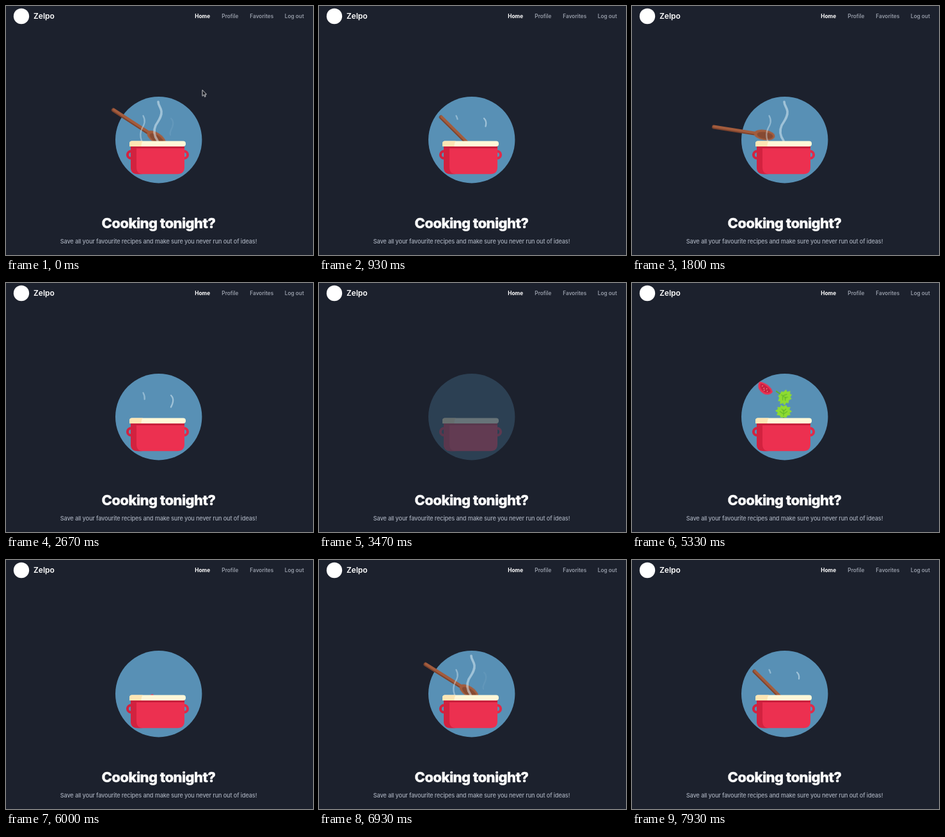
Write an HTML page that moves like this. It is 480 px wide and 390 px high and loops after 8 s.

```html
<!DOCTYPE html>
<html lang="en">
<head>
<meta charset="utf-8">
<title>Cooking tonight?</title>
<style>
  html, body { margin: 0; width: 100%; height: 100%; overflow: hidden; background: #1c212d; }
  svg { display: block; width: 100vw; height: 100vh; font-family: Inter, sans-serif; }
  text { fill: #fff; }
  .nav { font-size: 8.3px; font-weight: 600; }
  .nav .link { fill: #959ba7; }
  .nav .on { font-weight: 700; }
  .brand { font-size: 12px; font-weight: 600; }
  .title { font-size: 22px; font-weight: 800; letter-spacing: -.025em; text-anchor: middle; stroke: #fff; stroke-width: .35; }
  .sub { font-size: 9.2px; font-weight: 500; letter-spacing: -.017em; text-anchor: middle; fill: #a4abb8; }

  .fade, .spoon, .steam path, .cursor { animation: 8s linear infinite; }

  .fade { animation-name: fade; }
  @keyframes fade {
    0%, 40.25% { opacity: 1; }
    44.62% { opacity: 0; }
    51%, 100% { opacity: 1; }
  }

  .spoon { animation-name: stir, spoon-show; animation-timing-function: ease-in-out, linear; }
  @keyframes stir {
    0% { transform: translate(235px, 206.5px) rotate(33deg); }
    3.1%, 12.2%, 90%, 99.1% { transform: translate(248px, 231px) rotate(45deg); }
    7.5%, 16%, 87.5%, 94.4% { transform: translate(235.5px, 206px) rotate(33deg); }
    21%, 81.5% { transform: translate(207px, 202px) rotate(9deg); }
    100% { transform: translate(247px, 229px) rotate(44deg); }
  }
  @keyframes spoon-show {
    0%, 23% { opacity: 1; }
    30%, 81.5% { opacity: 0; }
    82.6%, 100% { opacity: 1; }
  }

  /* One wisp is drawn and wiped off per dash period of 4. */
  .steam { fill: none; stroke: #e1f0f8; stroke-linecap: round; }
  .steam path { stroke-dasharray: 1 3; }
  .mid { stroke-width: 3.6; stroke-opacity: .52; animation-name: mid !important; }
  .left { stroke-width: 2.3; stroke-opacity: .42; animation-name: left !important; }
  .right { stroke-width: 2.3; stroke-opacity: .52; animation-name: right, right-show !important; }
  @keyframes mid {
    0%, 4.4% { stroke-dashoffset: 0; }
    10.6% { stroke-dashoffset: -1.1; }
    16.9% { stroke-dashoffset: -2.9; }
    21.25%, 27% { stroke-dashoffset: -4; }
    33% { stroke-dashoffset: -5.1; }
    81.9% { stroke-dashoffset: -6.9; }
    86.3%, 91.2% { stroke-dashoffset: -8; }
    97.5%, 100% { stroke-dashoffset: -9.1; }
  }
  @keyframes left {
    0%, 6.25% { stroke-dashoffset: 0; }
    13.1% { stroke-dashoffset: -1.1; }
    17.25% { stroke-dashoffset: -2.9; }
    21.75%, 28.75% { stroke-dashoffset: -4; }
    35.6% { stroke-dashoffset: -5.1; }
    81.6% { stroke-dashoffset: -6.9; }
    86.1%, 93.1% { stroke-dashoffset: -8; }
    100% { stroke-dashoffset: -9; }
  }
  @keyframes right {
    0%, 8.1% { stroke-dashoffset: 0; }
    15.6% { stroke-dashoffset: -1.1; }
    22.5%, 31.8% { stroke-dashoffset: -4; }
    38% { stroke-dashoffset: -5.1; }
    85%, 95% { stroke-dashoffset: -8; }
    100% { stroke-dashoffset: -8.73; }
  }
  @keyframes right-show {
    0%, 86.9% { opacity: .15; }
    3%, 15.5%, 27%, 37.9%, 90%, 100% { opacity: 1; }
    15.6%, 22.5%, 38%, 85% { opacity: 0; }
  }

  .food { animation: fall 8s infinite backwards; }
  @keyframes fall {
    0% { transform: var(--from); opacity: 0; animation-timing-function: cubic-bezier(.333, 0, .667, .333); }
    1%, 12% { opacity: 1; }
    12% { transform: var(--to); }
    12.01%, 100% { transform: var(--to); opacity: 0; }
  }
  .herb1 { --from: translate(237px, 145px) rotate(0deg); --to: translate(237px, 232px) rotate(0deg); animation-delay: 4.56s; }
  .herb2 { --from: translate(239px, 153px) rotate(150deg); --to: translate(239px, 232px) rotate(75deg); animation-delay: 4.78s; }
  .tomato { --from: translate(206.5px, 161px) rotate(30deg); --to: translate(232px, 232px) rotate(80deg); animation-delay: 5.1s; }

  .cursor { animation-name: leave; }
  @keyframes leave {
    0%, .9% { transform: translate(307px, 131.5px); opacity: 1; }
    4.5% { transform: translate(428px, 180px); opacity: 1; }
    4.51%, 100% { transform: translate(428px, 180px); opacity: 0; }
  }
</style>
</head>
<body>
<svg viewBox="0 0 480 390">
  <defs>
    <g id="herb">
      <path d="M0 6V17" fill="none" stroke="#5fae2c" stroke-width="2"/>
      <path d="M-12-1L-8-3-9-6-4-6-4-9 0-7 4-9 5-6 10-6 8-3 12 0 8 2 10 5 5 6 4 9 0 8-4 9-5 6-10 5-8 2Z"
            fill="#8edb30" stroke="#8edb30" stroke-width="1.5" stroke-linejoin="round"/>
      <path d="M0 7V-3M0 4L-6 0M0 4L6 0M0 0L-3-4M0 0L4-4" fill="none" stroke="#63b92b" stroke-width="1.1"/>
    </g>
  </defs>

  <circle cx="24" cy="16" r="12.2" fill="#fff"/>
  <text class="brand" x="43" y="20">Zelpo</text>
  <g class="nav">
    <text class="on" x="295.3" y="19">Home</text>
    <text class="link" x="337.3" y="19">Profile</text>
    <text class="link" x="381.3" y="19">Favorites</text>
    <text class="link" x="435.8" y="19">Log out</text>
  </g>

  <circle class="fade" cx="238.7" cy="209.7" r="67.7" fill="#5890b5"/>

  <g class="food herb1"><use href="#herb"/></g>
  <g class="food herb2"><use href="#herb"/></g>
  <g class="food tomato">
    <path d="M-13-4C-7-8 7-8 13-2 13 5 6 9 0 8-7 8-13 3-13-4Z" fill="#ec3050"/>
    <path d="M-10-3C-5-5 5-5 10-1 9 4 4 6 0 5-5 5-9 2-10-3Z" fill="#c81f40"/>
    <path d="M-6-1h1M-2 1h1M2-1h1M5 2h1M0 3h1" stroke="#ffd9b0" stroke-width="1.3"/>
  </g>

  <g class="spoon">
    <path d="M-80 0H-10" stroke="#7e432d" stroke-width="6" stroke-linecap="round"/>
    <path d="M-80-.9H-10" stroke="#a35c3d" stroke-width="4" stroke-linecap="round"/>
    <ellipse rx="16.5" ry="8" fill="#a35c3d"/>
    <ellipse cx="1" cy=".6" rx="12.5" ry="5.4" fill="#864a32"/>
  </g>

  <g class="steam">
    <path class="mid" pathLength="1" d="M237 211C232 204 230 196 234 187 238 180 244 173 243 165 242 158 238 156 238 150"/>
    <path class="left" pathLength="1" d="M212 211C209 203 210 197 213 191 216 186 219 180 214.5 172"/>
    <path class="right" pathLength="1" d="M257 202C255 196 260 193 261 186 262 181 260 178 258 176"/>
  </g>

  <g class="fade">
    <g fill="none" stroke-width="4">
      <circle cx="195.5" cy="233" r="5.6" stroke="#d2223f"/>
      <circle cx="278.5" cy="233" r="5.6" stroke="#e02a49"/>
    </g>
    <path d="M195 217H279V252Q279 263.300 268 263.300H206Q195 263.300 195 252Z" fill="#ec3050"/>
    <path d="M195 217H204V252Q204 263.300 214 263.300H206Q195 263.300 195 252Z" fill="#d2223f"/>
    <path d="M195 219H279V223H195Z" fill="#c9203d"/>
    <rect x="193" y="211.5" width="88" height="8.400" rx="4" fill="#fff8d8"/>
    <path d="M197 211.500H214Q211.500 214 211.500 219.900H193V215.500Q193 211.500 197 211.500Z" fill="#fde6b4"/>
  </g>

  <text class="title" x="238.5" y="347.5">Cooking tonight?</text>
  <text class="sub" x="238.5" y="372">Save all your favourite recipes and make sure you never run out of ideas!</text>

  <path class="cursor" d="M0 0V9.500L2.200 7.500 3.700 10.800 5.200 10.100 3.800 7H6.600Z" fill="#10131a" stroke="#fff" stroke-width=".8"/>
</svg>
</body>
</html>
```
